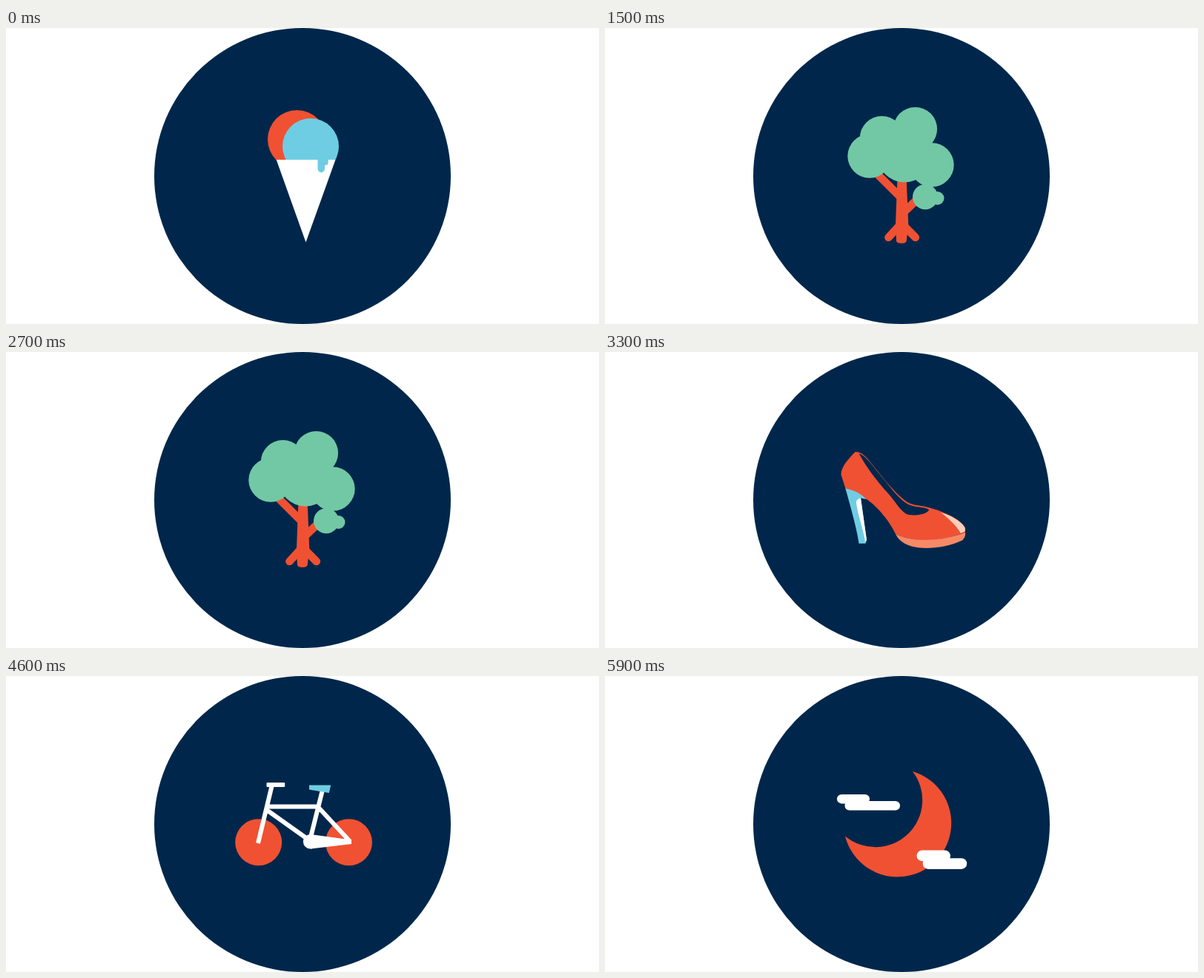
Animation of 800 by 400 pixels, one loop 6 s. Source, as an HTML page without scripts:

```html
<!DOCTYPE html>
<html lang="en">
<head>
<meta charset="utf-8">
<title>Icon flip book</title>
<style>
  html, body { margin: 0; width: 100%; height: 100%; overflow: hidden; background: #fff; }
  svg { display: block; width: 100%; height: 100%; }
  .navy { fill: #00274b; }
  .red { fill: #f05133; }
  .blue { fill: #6fcde3; }
  .green { fill: #72c8a5; }
  .salmon { fill: #f68967; }
  .white { fill: #fff; }
  .line { fill: none; stroke-width: 6; }
  .line.white { stroke: #fff; }
  .line.red { stroke: #f05133; stroke-linecap: round; }
</style>
</head>
<body>
<svg viewBox="0 0 800 400">
  <defs>
    <clipPath id="above-cone"><path d="M340 100H460V178H340z"/></clipPath>
    <clipPath id="drum-side">
      <path d="M339.7 152V206C345 214 372 218.5 400 218.5S455 214 460.3 206V152z"/>
    </clipPath>

    <g id="cone">
      <g clip-path="url(#above-cone)">
        <circle class="red" cx="392.5" cy="150.5" r="39.5"/>
        <circle class="blue" cx="411" cy="160" r="38"/>
      </g>
      <path class="white" d="M364.7 178H444.5L404.5 289.5z"/>
      <path class="blue" d="M420.5 177.5H434.7V182Q434.7 185.5 430 185.5V190.5A4.75 4.75 0 0 1 420.5 190.5z"/>
    </g>

    <g id="bottle">
      <g fill="#fdd9c9">
        <path d="M392 138.5L379.2 133.1A5.6 5.6 0 1 1 386.6 125.8z"/>
        <path d="M401.8 137.2L396.8 124.5A5.4 5.4 0 1 1 406.7 124.5z"/>
        <path d="M381.3 177C383 170 387 166.5 392 164.5C395 162 396 159 396 153.5C396 146.500 407 146.500 407 153.500C407 159 408 162 411 164.500C416 166.500 420 170 422 177z"/>
      </g>
      <path class="white" d="M379 192H424V196Q427.500 197.500 427.300 201L425.800 237L429.200 279Q429.200 284 425 284H378Q374 284 374 279L377.400 237L375.700 201Q375.700 197.500 379 196z"/>
      <path fill="#fba589" d="M377.300 176.300H425.800V193H377.300z"/>
      <path fill="#b8e3ef" d="M401.300 221.700H426.500V226.500H401.300zM401.300 249H426.800V253.800H401.300z"/>
    </g>

    <g id="bike">
      <g class="red">
        <circle cx="340.700" cy="224.700" r="31.500"/>
        <circle cx="462.500" cy="224.700" r="31.500"/>
      </g>
      <path class="line white" d="M359 147L340 226M353 176.500H423M351 180.500L410 222.500M427 154L411 218M421 177L464 223.500"/>
      <rect class="white" x="351.500" y="144" width="24.700" height="6" rx="1"/>
      <circle class="white" cx="410.700" cy="223.800" r="9.800"/>
      <path class="white" d="M411 214L466 221.500V227L411 233.600z"/>
      <path class="blue" d="M409 147.500H438.200L435.800 158L409 153.500z"/>
    </g>

    <g id="shoe">
      <path class="blue" d="M324 183C337 185 346 191 353 199L345 197.500L353 254L351.500 258.800H342.500C340 240 332 212 324 183z"/>
      <path class="white" d="M345 197.500L353 254L351 257C349 240 340 218 339 203Q339.500 198 345 197.500z"/>
      <path class="red" d="M337.500 135C330 143 318 155 318.500 166L324.500 184.500C337 187 346 192 353 199C368 209 384 229 392 246C415 258 458 257 485 243.500Q487 240 485 236C478 225 455 215 438 210.500C428 207 416 208 408 203C390 191 370 163 354 144Q345 134 337.500 135z"/>
      <path class="navy" d="M342.500 137C352 140 362 155 372 167C385 182 398 202 412 207C420 210 431 209 437 213C437 217 425 222 410 220C400 218 393 203 381 190C368 176 352 155 342.500 137z"/>
      <path class="salmon" d="M392 246C415 258 458 256 486 243.500Q487 250 482 254.500C460 265 432 267 415 263C403 260 396 254 392 246z"/>
      <path fill="#f9cfb9" d="M453 217C466 220 483 230 485.800 238V242.500L480 245C474 235 464 225 453 217z"/>
    </g>

    <g id="drum">
      <rect class="blue" x="394.500" y="215" width="10.600" height="62" rx="2"/>
      <path class="blue" stroke="#6fcde3" stroke-width="3" stroke-linejoin="round" d="M396 254.500L367.500 281.700L372 286.500L396 264zM404 254.500L432.500 281.700L428 286.500L404 264z"/>
      <g clip-path="url(#drum-side)">
        <path class="red" d="M339 150H461V220H339z"/>
        <path class="salmon" d="M350.500 150H362.700V220H350.500zM379.500 150H390.200V220H379.500zM410 150H422V220H410zM440 150H450.500V220H440z"/>
      </g>
      <ellipse class="white" cx="400" cy="152.300" rx="60.400" ry="12.300"/>
      <path class="line red" d="M311 116L375 153.700M406 150L478 131.500"/>
    </g>

    <g id="tree">
      <path class="red" d="M394.500 200H406.500L409.300 266L406.700 288Q406 291 400 291T393 288L392 266z"/>
      <path class="line red" style="stroke-width:10.700" d="M365 195L398 228M404 248L424 229M398 266L382.500 283M402 266L418.800 283"/>
      <g class="green">
        <circle cx="357" cy="173" r="29.700"/>
        <circle cx="373.500" cy="148.700" r="29.700"/>
        <circle cx="418.500" cy="136.500" r="29.600"/>
        <circle cx="441" cy="185" r="29.700"/>
        <circle cx="404" cy="172" r="36.500"/>
        <circle cx="432" cy="228.300" r="17"/>
        <circle cx="448.500" cy="230" r="9"/>
      </g>
    </g>

    <g id="moon">
      <path class="red" d="M415 129A72.700 72.700 0 1 1 324 216.500A63.500 63.500 0 0 0 415 129z"/>
      <g class="white">
        <rect x="313" y="160" width="44" height="12.400" rx="6.200"/>
        <rect x="323.500" y="169" width="74.500" height="12.500" rx="6.200"/>
        <rect x="420.500" y="235.500" width="45.500" height="14.700" rx="7.300"/>
        <rect x="428.700" y="246.200" width="59.500" height="14.700" rx="7.300"/>
      </g>
    </g>
  </defs>

  <circle class="navy" cx="400" cy="200" r="200"/>
  <!-- sixty hard cuts, 100 ms each -->
  <use href="#cone">
    <animate attributeName="href" calcMode="discrete" dur="6s" repeatCount="indefinite" values="
      #cone;#tree;#bottle;#cone;#tree;#bottle;#tree;#cone;#moon;#bottle;
      #bike;#shoe;#drum;#cone;#moon;#tree;#shoe;#moon;#cone;#bottle;
      #tree;#shoe;#bike;#cone;#moon;#bottle;#shoe;#tree;#bike;#drum;
      #moon;#cone;#bike;#shoe;#bottle;#moon;#bike;#cone;#shoe;#moon;
      #drum;#bottle;#shoe;#bike;#moon;#shoe;#bike;#moon;#shoe;#moon;
      #tree;#drum;#tree;#cone;#drum;#bottle;#tree;#shoe;#bottle;#moon"/>
  </use>
</svg>
</body>
</html>
```
